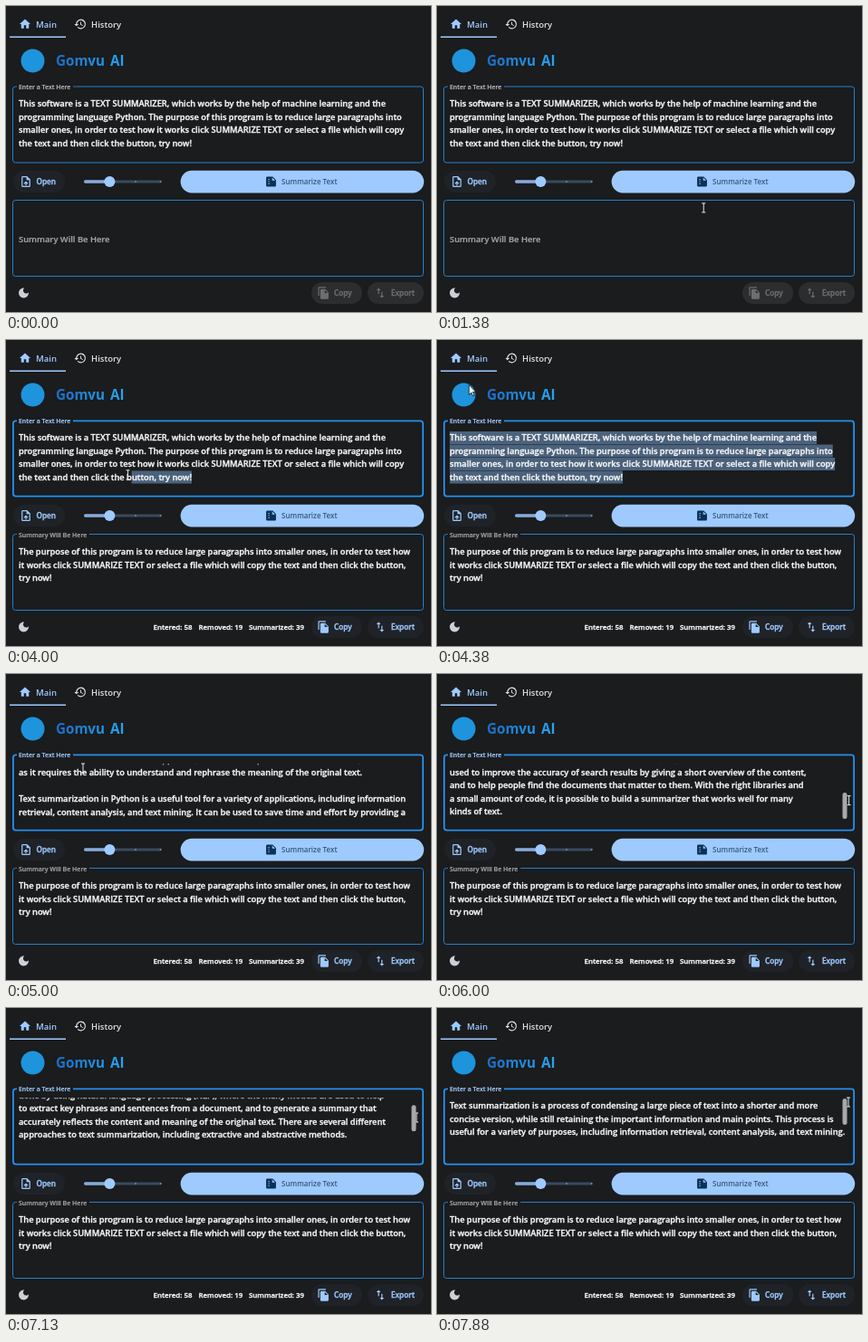
An HTML page with a canvas that plays this animation: 469 px wide and 338 px high, repeating every 8000 ms.

```html
<!DOCTYPE html>
<html lang="en">
<head>
<meta charset="utf-8">
<title>Text summarizer</title>
<style>
html, body { margin: 0; width: 100%; height: 100%; overflow: hidden; background: #1a1c1e; }
canvas { display: block; width: 469px; height: 338px; }
</style>
</head>
<body>
<canvas id="stage"></canvas>
<script>
const W = 469, H = 338, LOOP = 8000;
const canvas = document.getElementById('stage');
const ctx = canvas.getContext('2d');
const dpr = window.devicePixelRatio || 1;
canvas.width = W * dpr;
canvas.height = H * dpr;

const BG = '#1a1c1e', BLUE = '#9fcaff', NAVY = '#0b3157', WHITE = '#f6f7f8', GREY = '#a3a5a8';
const FAMILY = '"Open Sans", "Noto Sans", sans-serif';
const BODY = 9.28, LINE = 14.5, LEFT = 14, FIRST = 108, MAX_SCROLL = 362;
const CLICK = 2250, FOCUS = 3640, PASTE = 4900;

const intro = [
  'This software is a TEXT SUMMARIZER, which works by the help of machine learning and the',
  'programming language Python. The purpose of this program is to reduce large paragraphs into',
  'smaller ones, in order to test how it works click SUMMARIZE TEXT or select a file which will copy',
  'the text and then click the button, try now!'
];
const summary = [
  'The purpose of this program is to reduce large paragraphs into smaller ones, in order to test how',
  'it works click SUMMARIZE TEXT or select a file which will copy the text and then click the button,',
  'try now!'
];
const article = [
  'Text summarization is a process of condensing a large piece of text into a shorter and more',
  'concise version, while still retaining the important information and main points. This process is',
  'useful for a variety of purposes, including information retrieval, content analysis, and text mining.',
  '',
  'In Python, text summarization of a document or of a longer piece of writing can be',
  'done by using natural language processing (NLP), where the many models are used to help',
  'to extract key phrases and sentences from a document, and to generate a summary that',
  'accurately reflects the content and meaning of the original text. There are several different',
  'approaches to text summarization, including extractive and abstractive methods.',
  '',
  'Extractive summarization involves selecting the most important sentences or phrases from',
  'the original text and combining them to form a summary. This method is simple to build',
  'and is often used for news articles and other documents with a clear structure.',
  '',
  'Abstractive summarization, on the other hand, involves generating a new text that conveys',
  'the main ideas of the original document in a shorter form. The result may contain words',
  'and sentences that do not appear in the source, and it often reads more like a summary',
  'that was written by a person.',
  '',
  'It is less direct than the extractive approach, but more complex to write and to build,',
  'as it requires the ability to understand and rephrase the meaning of the original text.',
  '',
  'Text summarization in Python is a useful tool for a variety of applications, including information',
  'retrieval, content analysis, and text mining. It can be used to save time and effort by providing a',
  'condensed version of a document that is more easily digestible and easier to read. It can also be',
  'used to improve the accuracy of search results by giving a short overview of the content,',
  'and to help people find the documents that matter to them. With the right libraries and',
  'a small amount of code, it is possible to build a summarizer that works well for many',
  'kinds of text.'
];

const icons = Object.fromEntries(Object.entries({
  home: 'M10 20v-6h4v6h5v-8h3L12 3 2 12h3v8z',
  history: 'M13 3a9 9 0 0 0-9 9H1l3.9 3.9L9 12H6a7 7 0 1 1 2 4.9l-1.4 1.4A9 9 0 1 0 13 3zM12 8v5l4.3 2.5.7-1.2-3.5-2.1V8z',
  upload: 'M14 2H6a2 2 0 0 0-2 2v16a2 2 0 0 0 2 2h12a2 2 0 0 0 2-2V8zM18 20H6V4h7v5h5zM8 15l1.4 1.4L11 14.8V19h2v-4.2l1.6 1.6L16 15l-4-4z',
  notes: 'M15 3H5a2 2 0 0 0-2 2v14a2 2 0 0 0 2 2h14a2 2 0 0 0 2-2V9zM7 7h2v2H7zM7 11h2v2H7zM7 15h2v2H7zM14 10V4.5L19.5 10z',
  copy: 'M16 1H4a2 2 0 0 0-2 2v14h2V3h12zM15 5H8a2 2 0 0 0-2 2v14a2 2 0 0 0 2 2h11a2 2 0 0 0 2-2V11zM14 12V6.5L19.5 12z',
  swap: 'M9 3 5 7h3v7h2V7h3zM16 17v-7h-2v7h-3l4 4 4-4z',
  moon: 'M12 3c-5 0-9 4-9 9s4 9 9 9 9-4 9-9c0-.5 0-.9-.1-1.4-1 1.4-2.6 2.3-4.4 2.3-3 0-5.4-2.4-5.4-5.4 0-1.8.9-3.4 2.3-4.4-.5-.1-.9-.1-1.4-.1z'
}).map(([name, d]) => [name, new Path2D(d)]));

// Keyframes: time, then values
const scrollKeys = [[PASTE, 0], [5000, 288.4], [5130, 362], [6250, 362], [6630, 305.5], [7130, 84], [7700, 0]];
const mouseKeys = [
  [250, 240, 342], [880, 300, 250], [1750, 290, 203], [CLICK, 282, 201], [2650, 282, 201],
  [3500, 214, 158], [3640, 206, 151], [3780, 206, 151], [4000, 135, 149], [4170, 60, 120],
  [4330, 12, 24], [4490, 85, 104], [5380, 85, 104], [5850, 460, 138], [6130, 450, 141],
  [6630, 450, 140], [7130, 453, 121], [7800, 454, 104]
];

function track(keys, t) {
  if (t <= keys[0][0]) return keys[0].slice(1);
  const i = keys.findIndex(k => k[0] > t);
  if (i < 0) return keys[keys.length - 1].slice(1);
  const a = keys[i - 1], b = keys[i], p = (t - a[0]) / (b[0] - a[0]);
  return a.slice(1).map((v, n) => v + (b[n + 1] - v) * p);
}
const ramp = (t, from, length) => Math.max(0, Math.min(1, (t - from) / length));

function setFont(size, weight = 600) { ctx.font = `${weight} ${size}px ${FAMILY}`; }

// y is the middle of the capitals, heft thickens the strokes
function text(str, x, y, size, color, heft = 0.35, weight = 600) {
  setFont(size, weight);
  ctx.fillStyle = ctx.strokeStyle = color;
  ctx.fillText(str, x, y + size * 0.36);
  if (!heft) return;
  ctx.lineWidth = heft;
  ctx.lineJoin = 'round';
  ctx.strokeText(str, x, y + size * 0.36);
}

function icon(name, x, y, color, size = 14.5) {
  ctx.save();
  ctx.translate(x - size / 2, y - size / 2);
  ctx.scale(size / 24, size / 24);
  ctx.fillStyle = color;
  ctx.fill(icons[name], 'evenodd');
  ctx.restore();
}

function pill(x, y, w, h, r, color) {
  ctx.fillStyle = color;
  ctx.beginPath();
  ctx.roundRect(x, y, w, h, r);
  ctx.fill();
}

function disc(x, y, r, color) { pill(x - r, y - r, 2 * r, 2 * r, r, color); }

// The border lies inside the box, so focus thickens it inwards
function field(y, gap, focused) {
  const line = focused ? 1.8 : 1;
  ctx.strokeStyle = focused ? '#2390ee' : '#2480cc';
  ctx.lineWidth = line;
  ctx.beginPath();
  ctx.roundRect(7 + line / 2, y + line / 2, 454 - line, 85 - line, 3);
  ctx.stroke();
  if (gap) {
    ctx.fillStyle = BG;
    ctx.fillRect(12, y - 1, gap, 4);
  }
}

function drawHeader() {
  icon('home', 21, 20, BLUE);
  text('Main', 33, 20.5, 9.5, BLUE, 0);
  icon('history', 82, 20, '#e2e2e6');
  text('History', 94, 20.5, 9.5, '#e2e2e6', 0);
  ctx.fillStyle = BLUE;
  ctx.fillRect(4, 33.5, 62, 1.5);

  disc(29.5, 60.5, 13, '#1e94dc');
  const shade = ctx.createLinearGradient(55, 0, 131, 0);
  shade.addColorStop(0, '#1c6cc4');
  shade.addColorStop(1, '#27a5f0');
  text('Gomvu', 55, 61, 15.2, shade, 0, 700);
  text('AI', 115, 61, 15.2, shade, 0, 700);
}

function drawSelection(t) {
  if (t < 3780 || t >= PASTE) return;
  const [mx, my] = track(mouseKeys, Math.min(t, 4330));
  const row = Math.max(0, Math.min(3, Math.floor((my - 101) / LINE)));
  setFont(BODY);
  ctx.fillStyle = '#4b627c';
  for (let i = row; i < 4; i++) {
    const end = LEFT + ctx.measureText(intro[i]).width;
    const start = i === row && my > 101 ? Math.max(LEFT, Math.min(end, mx + 4)) : LEFT;
    ctx.fillRect(start, 101 + i * LINE, end - start, 14);
  }
}

function drawInput(t) {
  const focused = t >= FOCUS;
  field(88.5, 62, focused);
  text('Enter a Text Here', LEFT, 89.5, 6.95, focused ? BLUE : '#b4b6ba', 0.2);
  drawSelection(t);
  const scroll = t < PASTE ? 0 : track(scrollKeys, t)[0];
  ctx.save();
  ctx.beginPath();
  ctx.rect(9, 99.4, 450, 60);
  ctx.clip();
  (t < PASTE ? intro : article).forEach((line, i) => {
    const y = FIRST + i * LINE - scroll;
    if (y > 85 && y < 175) text(line, LEFT, y, BODY, WHITE);
  });
  ctx.restore();
  return scroll;
}

function button(x, w, y, name, iconX, label, labelX, on) {
  pill(x, y, w, 24, 12, on ? '#1f2328' : '#2b2d2f');
  const color = on ? BLUE : '#6c6e71';
  icon(name, iconX, y + 12, color);
  text(label, labelX, y + 12.5, 8.2, color);
}

function drawControls() {
  button(8, 57, 182, 'upload', 22, 'Open', 33.5, true);
  pill(86, 192.6, 86, 2.8, 1.4, '#384a5f');
  pill(86, 192.3, 28, 3.4, 1.7, '#86abd8');
  disc(143, 194, 0.8, '#8fb2dc');
  disc(170.5, 194, 0.8, '#8fb2dc');
  disc(114.4, 194, 6, BLUE);
  pill(192.6, 181.8, 268.6, 24.6, 12.3, BLUE);
  icon('notes', 292.5, 194, NAVY);
  text('Summarize Text', 304, 194.5, 8, '#33587f', 0);
}

function drawSummary(t) {
  const done = t >= CLICK;
  const p = 1 - Math.pow(1 - ramp(t, CLICK, 167), 2);
  field(214, 80 * p, false);
  text('Summary Will Be Here', LEFT, 257.5 - 42.5 * p, 9.35 - 2.35 * p, GREY, 0.2);
  if (done) {
    summary.forEach((line, i) => text(line, LEFT, 234 + i * LINE, BODY, WHITE));
    text('Entered: 58', 162.5, 317.5, 7.9, WHITE);
    text('Removed: 19', 212.5, 317.5, 7.9, WHITE);
    text('Summarized: 39', 268, 317.5, 7.9, WHITE);
  }
  icon('moon', 19.5, 317, '#cdd1d7');
  button(337, 56, 305, 'copy', 350.5, 'Copy', 362, done);
  button(399, 62, 305, 'swap', 413, 'Export', 425, done);
}

function polygon(points, x, y) {
  ctx.beginPath();
  points.forEach(([px, py]) => ctx.lineTo(x + px, y + py));
  ctx.closePath();
  ctx.fillStyle = '#fff';
  ctx.strokeStyle = '#111';
  ctx.lineWidth = 0.8;
  ctx.fill();
  ctx.stroke();
}

const arrow = [[0, 0], [0, 11], [2.6, 8.6], [4.4, 12.4], [6, 11.7], [4.3, 8], [7.6, 8]];
const hand = [[-2.6, -5.5], [-1, -5.5], [-0.8, -1.6], [3.4, -0.6], [4.2, 0.6], [3.4, 6.6], [-1.6, 6.6], [-4.8, 1.4], [-4, 0.4], [-2.6, 1.8]];

function drawMouse(t) {
  if (t < 250) return;
  const [x, y] = track(mouseKeys, t);
  const inside = (top, bottom) => x > 7 && x < 462 && y > top && y < bottom;
  if (inside(182, 206)) polygon(hand, x, y);
  else if (inside(89, 173) || inside(214, 299)) {
    ctx.strokeStyle = '#e8e8e8';
    ctx.lineWidth = 1;
    ctx.beginPath();
    ctx.moveTo(x - 2, y - 5);
    ctx.lineTo(x + 2, y - 5);
    ctx.moveTo(x, y - 5);
    ctx.lineTo(x, y + 5);
    ctx.moveTo(x - 2, y + 5);
    ctx.lineTo(x + 2, y + 5);
    ctx.stroke();
  } else polygon(arrow, x, y);
}

function draw(t) {
  ctx.setTransform(dpr, 0, 0, dpr, 0, 0);
  ctx.fillStyle = BG;
  ctx.fillRect(0, 0, W, H);
  drawHeader();
  const scroll = drawInput(t);
  drawControls();
  drawSummary(t);
  drawMouse(t);
  ctx.globalAlpha = ramp(t, 5010, 110);
  pill(447.5, 100 + scroll / MAX_SCROLL * 31, 5, 29, 2.5, '#a6a8ab');
  ctx.globalAlpha = 1;
}

const begin = performance.now();
function tick() {
  draw((performance.now() - begin) % LOOP);
  requestAnimationFrame(tick);
}
tick();
</script>
</body>
</html>
```
